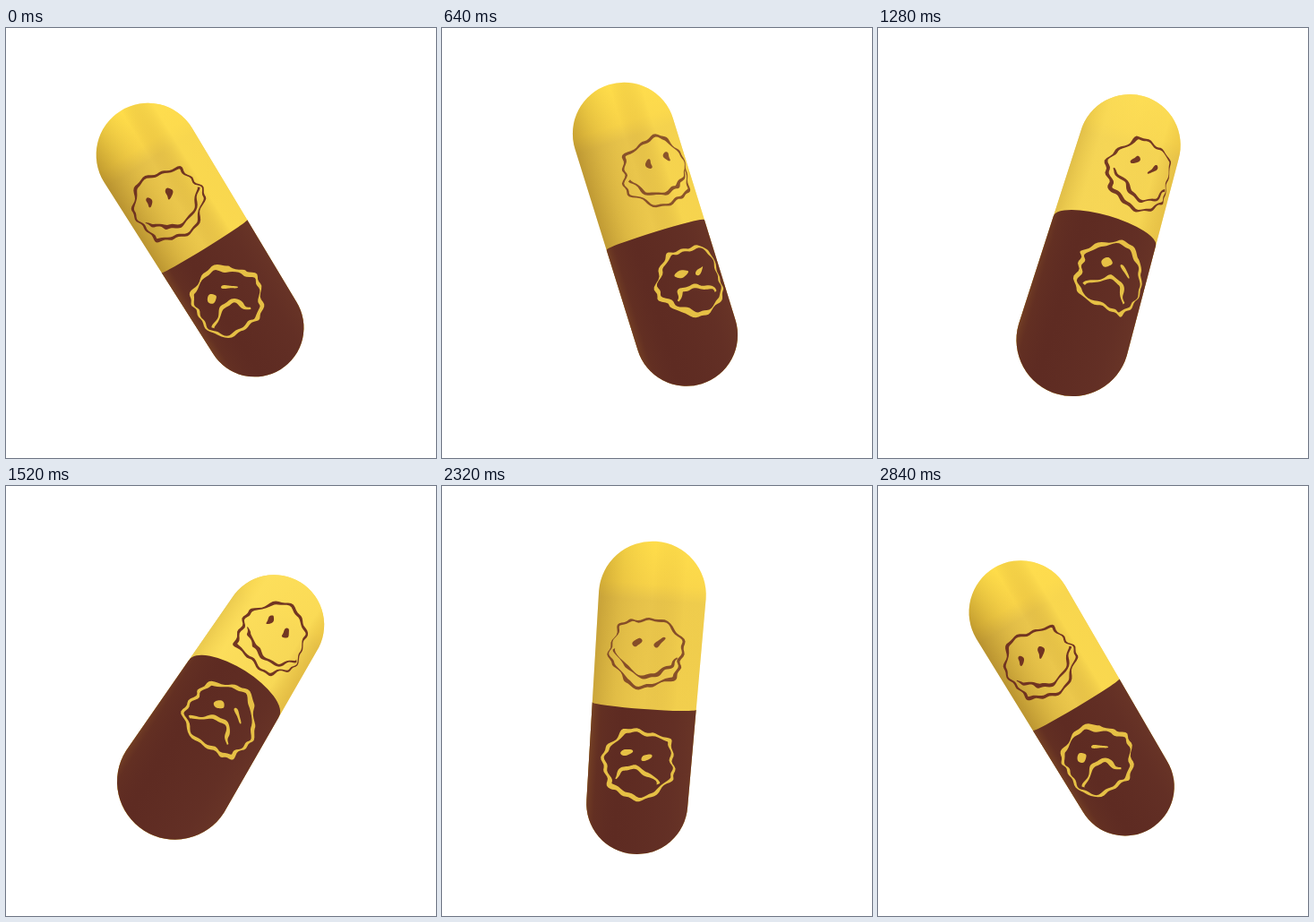
Recreate the animation shown at these times as an HTML page with a canvas. Size 480x480 px, loop 2880 ms.

```html
<!DOCTYPE html>
<html lang="en">
<head>
<meta charset="utf-8">
<title>Mood capsule</title>
<style>
  html, body { margin: 0; width: 100%; height: 100%; overflow: hidden; background: #fff; }
  canvas { display: block; width: 100vw; height: 100vh; }
</style>
</head>
<body>
<canvas id="stage" width="480" height="480"></canvas>
<script>
const ctx = document.getElementById('stage').getContext('2d');
const LOOP = 2880, STEP = 40, TAU = Math.PI * 2;
const BROWN = '#5e2b22', INK = '#6c2f20', GOLD = '#e6c045';

// Key poses: time, centre x y, tilt (deg), pitch towards the viewer, spin (deg)
const poses = [
  [0, 218, 238, 31.7, -.15, -12.6],
  [320, 227, 234, 26.3, -.1, 10],
  [560, 235, 230.5, 19.5, -.03, 24],
  [1000, 251.3, 234.5, 5.2, .06, 40],
  [1520, 244, 242.5, -32.3, .43, 7.5],
  [1700, 241, 242, -36.3, .36, 0],
  [2000, 236, 237.5, -21.8, .08, -4.5],
  [2320, 226.3, 238, -4.2, -.17, -2]
];

const clamp = (v, lo, hi) => Math.max(lo, Math.min(hi, v));
const range = (n, f) => Array.from({ length: n }, (_, i) => f(i));

// Smooth periodic curve through the key poses
function poseAt(t) {
  const n = poses.length;
  const row = i => poses[(i + n) % n];
  const time = i => row(i)[0] + Math.floor(i / n) * LOOP;
  let i = n - 1;
  while (poses[i][0] > t) i--;
  const h = time(i + 1) - time(i), u = (t - time(i)) / h, v = 1 - u;
  const slope = (j, c) => {
    const a = time(j) - time(j - 1), b = time(j + 1) - time(j);
    const da = (row(j)[c] - row(j - 1)[c]) / a, db = (row(j + 1)[c] - row(j)[c]) / b;
    return (b * da + a * db) / (a + b);
  };
  return range(5, k => {
    const c = k + 1;
    return row(i)[c] * (1 + 2 * u) * v * v + row(i + 1)[c] * u * u * (3 - 2 * u)
      + h * u * v * (slope(i, c) * v - slope(i + 1, c) * u);
  });
}

// Liquid ripple: rows slide sideways, columns slide up and down
const ripple = phase => (x, y) => [
  x + 2.6 * Math.sin(y * .15 + phase) + 1.7 * Math.sin(y * .42 - phase),
  y + 2.2 * Math.sin(x * .13 - phase) + 1.1 * Math.sin(x * .36 + phase)
];

function fillShape(map, ...loops) {
  ctx.beginPath();
  for (const loop of loops) {
    loop.forEach(([x, y], i) => {
      const p = map(x, y);
      if (i) ctx.lineTo(...p); else ctx.moveTo(...p);
    });
    ctx.closePath();
  }
  ctx.fill('evenodd');
}

function oval(x, y, rx, ry, tilt = 0) {
  const c = Math.cos(tilt), s = Math.sin(tilt);
  return range(90, i => {
    const a = i / 90 * TAU, dx = rx * Math.cos(a), dy = ry * Math.sin(a);
    return [x + dx * c - dy * s, y + dx * s + dy * c];
  });
}

// Quadratic stroke, fuller in the middle
function curve([x0, y0], [cx, cy], [x1, y1], weight) {
  const edge = side => range(41, i => {
    const u = i / 40, v = 1 - u;
    const w = side * weight * (.6 + .4 * Math.sin(Math.PI * u));
    const dx = v * (cx - x0) + u * (x1 - cx), dy = v * (cy - y0) + u * (y1 - cy);
    const len = Math.hypot(dx, dy);
    return [v * v * x0 + 2 * u * v * cx + u * u * x1 - w * dy / len,
      v * v * y0 + 2 * u * v * cy + u * u * y1 + w * dx / len];
  });
  return edge(-1).concat(edge(1).reverse());
}

function face(map, phase, happy) {
  const w = happy ? 3 : 4.2;
  const dx = Math.cos(phase) * .8, dy = Math.sin(phase) * .8;
  fillShape(map, oval(0, 0, 42, 39), oval(dx, dy, 42 - w, 39 - w));
  if (happy) {
    fillShape(map, oval(-12, -12, 3, 5.5, .3));
    fillShape(map, oval(11, -12, 3.6, 6, .35));
    fillShape(map, curve([-34, 2], [1, 48], [37, 3], 1.8));
  } else {
    fillShape(map, oval(-12, -11, 6, 3.6, -.35));
    fillShape(map, oval(10, -10, 6, 3.7, .35));
    fillShape(map, curve([-27, 18], [-2, -10], [21, 20], 2.3));
  }
}

function wash(x0, y0, x1, y1, stops) {
  const g = ctx.createLinearGradient(x0, y0, x1, y1);
  stops.forEach(([at, color]) => g.addColorStop(at, color));
  ctx.fillStyle = g;
  ctx.fillRect(-90, -260, 180, 520);
}

function draw(t) {
  const [x, y, tiltDeg, pitch, spinDeg] = poseAt(t);
  const tilt = tiltDeg * Math.PI / 180, spin = spinDeg * Math.PI / 180;
  const w = t / LOOP * TAU;

  // Perspective: the end nearer the viewer grows and the seam bends away from it
  const size = 58.2 - 2.1 * Math.cos(w - .35);
  const h = 2.06 * size * (1 - .9 * pitch * pitch);
  const r0 = size * (1 - .17 * pitch), r1 = size * (1 + .17 * pitch);
  const seam = -45 * pitch, bulge = -4 - .75 * size * pitch;
  const radiusAt = d => r0 + (r1 - r0) * clamp((d + h) / (2 * h), 0, 1);
  const lean = clamp(tilt / .56, -1, 1), facing = clamp(pitch / .4, 0, 1);

  ctx.fillStyle = '#fff';
  ctx.fillRect(0, 0, 480, 480);
  ctx.save();
  ctx.translate(x, y);
  ctx.rotate(-tilt);
  ctx.beginPath();
  ctx.arc(0, -h, r0, Math.PI, 0);
  ctx.arc(0, h, r1, 0, Math.PI);
  ctx.closePath();
  ctx.clip();

  // Yellow half: bright cap, duller wall, light from the upper right
  wash(0, -h - r0, 0, seam, [
    [0, '#ffdd4a'], [.26, '#f8d348'], [.36, '#e8c44b'], [1, '#ecc84c']
  ]);
  wash(-r0, 0, r0, 0, [
    [0, `rgba(135,95,20,${.36 + .14 * lean})`],
    [.22, `rgba(150,110,25,${.14 + .1 * lean})`],
    [.5, 'rgba(200,160,50,0)'],
    [.8, `rgba(255,222,80,${.35 + .4 * lean})`],
    [1, `rgba(255,222,80,${.35 + .35 * lean})`]
  ]);
  ctx.globalAlpha = facing;
  wash(-r0, 0, r0, 0, [
    [0, 'rgba(252,222,90,.6)'], [.2, 'rgba(253,223,92,.95)'],
    [.8, 'rgba(250,219,88,.85)'], [1, 'rgba(225,185,65,.6)']
  ]);
  ctx.globalAlpha = 1;

  // Brown half below the curved seam
  ctx.save();
  ctx.beginPath();
  ctx.moveTo(-90, seam);
  ctx.ellipse(0, seam, radiusAt(seam), Math.abs(bulge), 0, Math.PI, 0, bulge > 0);
  ctx.lineTo(90, seam);
  ctx.lineTo(90, 260);
  ctx.lineTo(-90, 260);
  ctx.closePath();
  ctx.clip();
  ctx.fillStyle = BROWN;
  ctx.fillRect(-90, -260, 180, 520);
  wash(-r1, 0, r1, 0, [
    [0, 'rgba(160,105,40,.3)'], [.08, 'rgba(140,85,40,.1)'],
    [.3, 'rgba(110,60,45,0)'], [.8, 'rgba(120,66,50,.18)'],
    [1, 'rgba(130,75,50,.28)']
  ]);
  ctx.restore();

  // Faces lie on the curved wall
  const gap = 64 * (1 - .9 * pitch * pitch);
  const onWall = (offset, phase) => {
    const bend = ripple(phase);
    return (px, py) => {
      const [qx, qy] = bend(px, py);
      const a = clamp(spin + qx * 1.08 / size, -Math.PI / 2, Math.PI / 2);
      const along = seam + bulge * (Math.cos(a) - .15) + offset + qy;
      return [radiusAt(along) * Math.sin(a), along];
    };
  };
  const phase = 2 * w;
  ctx.globalAlpha = .86 + .1 * Math.cos(2 * w);
  ctx.fillStyle = INK;
  face(onWall(-gap, phase), phase, true);
  ctx.globalAlpha = 1;
  ctx.fillStyle = GOLD;
  face(onWall(gap, phase + 2), phase + 2, false);
  ctx.restore();
}

const start = performance.now();
function tick() {
  const t = (performance.now() - start) % LOOP;
  draw(Math.floor(t / STEP) * STEP);
  requestAnimationFrame(tick);
}
tick();
</script>
</body>
</html>
```
